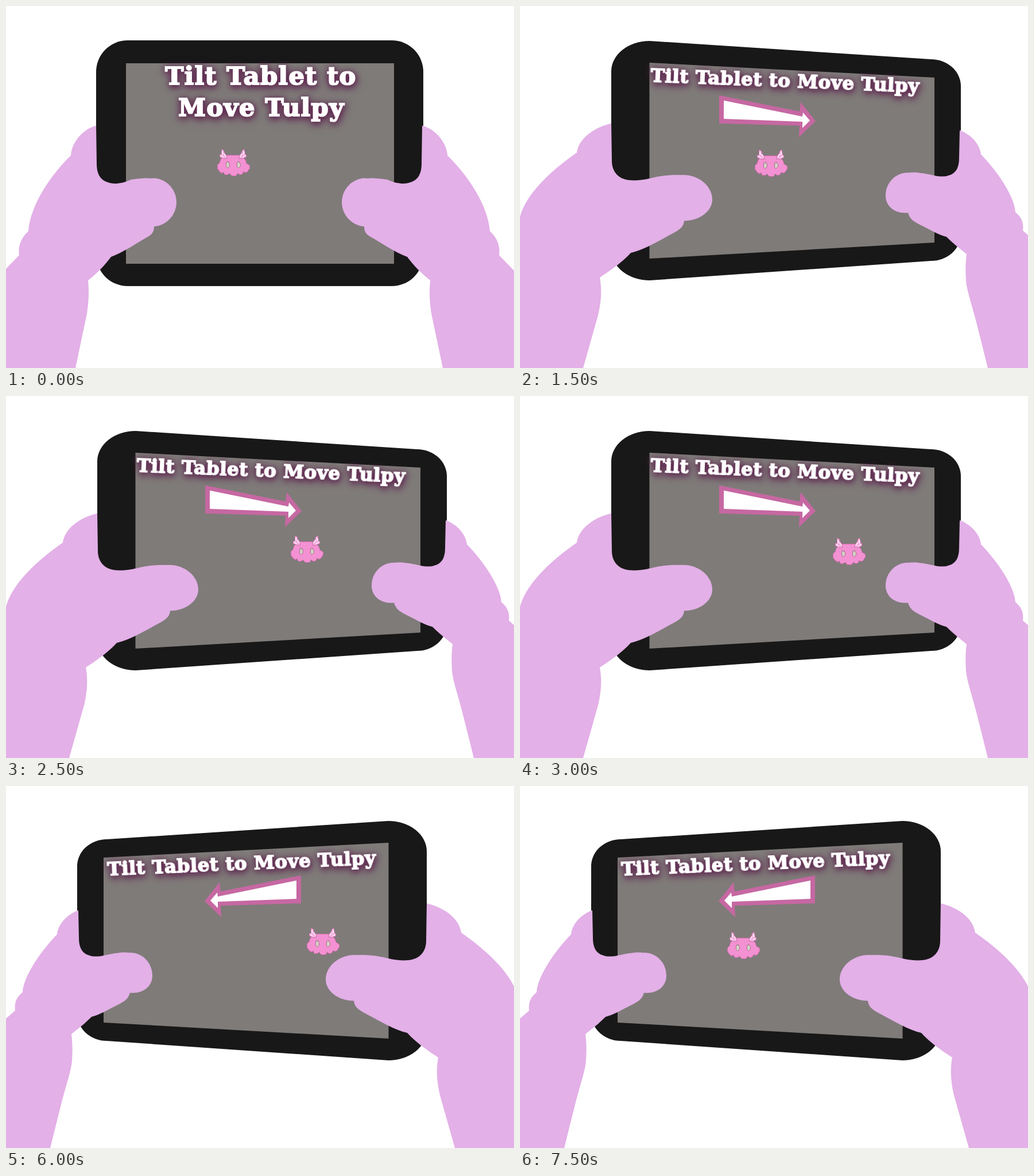
Write an HTML page that moves like this. It is 885 px wide and 632 px high and loops after 8000 ms.

```html
<!DOCTYPE html>
<html lang="en">
<head>
<meta charset="utf-8">
<title>Tilt to move</title>
<style>
  html, body { margin: 0; width: 100%; height: 100%; overflow: hidden; background: #fff; }
  svg { display: block; width: 885px; height: 632px; }

  .case { fill: #181818; }
  .screen { fill: #7f7b79; }
  .hand { fill: #e3b0e7; }
  .rim { fill: #c668a2; }
  .white { fill: #fff; }

  text {
    font: bold 32.4px "DejaVu Serif", "Noto Serif", serif;
    letter-spacing: .6px;
    fill: #fff;
    stroke: #fff;
    stroke-width: 1.8px;
    filter: drop-shadow(1px 3px 6px #5c1f4c) drop-shadow(0 1px 6px #5c1f4caa);
  }
  .mid { text-anchor: middle; }
  .big { font-size: 43px; letter-spacing: 1.5px; stroke-width: 2.2px; }
  .small { font-size: 31px; }

  .scene, #pet { animation: 8s step-end infinite; }
  .scene { visibility: hidden; }
  #level { animation-name: level; }
  #intro { animation-name: intro; }
  #right { animation-name: right; }
  #hold { animation-name: hold; }
  #left { animation-name: left; }
  #pet { animation-name: walk; }

  @keyframes level {
    0%, 43.75% { visibility: visible; }
    12.5%, 75%, 100% { visibility: hidden; }
  }
  @keyframes intro {
    0% { visibility: visible; }
    12.5%, 100% { visibility: hidden; }
  }
  @keyframes right {
    0%, 43.75%, 100% { visibility: hidden; }
    12.5% { visibility: visible; }
  }
  @keyframes hold {
    0%, 75%, 100% { visibility: hidden; }
    43.75% { visibility: visible; }
  }
  @keyframes left {
    0% { visibility: hidden; }
    75%, 100% { visibility: visible; }
  }
  @keyframes walk {
    0% { transform: translate(367px, 249px); }
    12.5% { transform: translate(383px, 251px); }
    18.75% { transform: translate(408px, 250px); }
    25% { transform: translate(452px, 252px); }
    31.25% { transform: translate(495px, 243px); }
    37.5% { transform: translate(544px, 247px); }
    43.75% { transform: translate(523px, 244px); }
    75% { transform: translate(523px, 247px); }
    81.25% { transform: translate(482px, 249px); }
    87.5% { transform: translate(439px, 253px); }
    93.75%, 100% { transform: translate(360px, 254px); }
  }
</style>
</head>
<body>
<svg viewBox="0 0 885 632">
  <defs>
    <path id="grip" class="hand" d="M157 209C135 214 114 238 113 261C75 298 42 350 39 393C28 403 20 418 23 435
      L-6 465V632H121L141 537C144 515 145 500 143 479C158 467 172 453 183 438C205 430 230 412 247 403
      C256 398 258 392 258 385A42.5 42.5 0 0 0 260 300.5C255 301 250 301 244 300.5
      C234 301 226 302 218 303C207 308 198 310 190 310C168 309 158 298 158 275Z"/>

    <g id="tilted">
      <path class="case" d="M226 61A67 53 0 0 0 159 114V426A67 53 0 0 0 226 479L716 445A52 47 0 0 0 768 398V141
        A52 47 0 0 0 716 93Z"/>
      <path class="screen" d="M225.5 99L722 125V413L225.5 441Z"/>
      <path class="hand" d="M159 205C128 212 102 232 99 256C50 290 10 330 0 368V632H110L136 540
        C143 510 142 490 139 474C165 457 180 445 193 431C215 426 240 411 268 396C279 390 285 385 286 375
        C313 375 335 358 335 338C335 314 311 295 285 295C280 295 272 295 267 295C245 296 235 299 226 301
        C215 304 200 305 190 304C172 302 160 290 160 270Z"/>
      <path class="hand" d="M766 217C785 224 801 240 803 259C835 292 862 335 863 360C873 368 878 378 876 392
        L893 407V632H815L797 560C787 520 779 500 777 480C776 460 776 450 778 433C765 423 755 415 743 403
        C730 400 715 391 705 386C690 378 680 375 676 361C653 363 637 350 637 331C637 308 655 291 675 291
        C680 291 687 290 693 291C705 292 712 294 722 296C730 298 742 298 746 296C758 293 765 284 765 265Z"/>
    </g>

    <g id="arrow">
      <path class="rim" d="M347 156L487 184L489 168L515 201L486 229L487 209L347 205Z"/>
      <path class="white" d="M355 165L492 193L493 186L505 200L492 213L492 202L355 197Z"/>
    </g>

    <g id="ear">
      <path d="M9 1l3 2 2 5 4 5-1 5-5-1-6-2-1-4 3-1v-4z" fill="#f5aede" stroke="#c876a8"/>
      <path d="M10 4v6M7 11l4 5M13 9l3 5" fill="none" stroke="#fdeaf7" stroke-width="1.6"/>
    </g>
    <path id="eye" d="M19 22l3 4v5l-3 3-3-3v-5z" fill="#d6cfc6" stroke="#a8748f"/>
  </defs>

  <g id="level" class="scene">
    <rect class="case" x="157" y="60" width="570" height="429" rx="55"/>
    <path class="screen" d="M209 100H676V450H209Z"/>
    <use href="#grip"/>
    <use href="#grip" transform="translate(882 0) scale(-1 1)"/>
  </g>

  <g id="intro" class="scene">
    <text class="mid big" x="444" y="137">Tilt Tablet to</text>
    <text class="mid big" x="445" y="192">Move Tulpy</text>
  </g>

  <g id="right" class="scene">
    <use href="#tilted"/>
    <use href="#arrow"/>
    <text transform="translate(227.5 132) rotate(2.3)">Tilt Tablet to Move Tulpy</text>
  </g>

  <g id="hold" class="scene">
    <text class="mid small" x="441" y="127">Hold Tablet Level to</text>
    <text class="mid small" x="441" y="165">Stop Moving</text>
  </g>

  <g id="left" class="scene">
    <use href="#tilted" transform="translate(892 0) scale(-1 1)"/>
    <use href="#arrow" transform="translate(861 0) scale(-1 1)"/>
    <text transform="translate(177 156) rotate(-2.4)">Tilt Tablet to Move Tulpy</text>
  </g>

  <g id="pet" shape-rendering="crispEdges">
    <path d="M19 11h20l6 3 5 6 2 6 5 3v6l-3 5-4 2-3-2-2 4-4 2-4-3-3 4h-8l-4-4-3 3-5-1-2-4-3 2-4-3-4-6v-5l4-4 2-6 4-5z"
      fill="#f391d2" stroke="#cf6fae"/>
    <use href="#ear"/>
    <use href="#ear" transform="translate(57 0) scale(-1 1)"/>
    <use href="#eye"/>
    <use href="#eye" transform="translate(57 0) scale(-1 1)"/>
  </g>
</svg>
</body>
</html>
```
